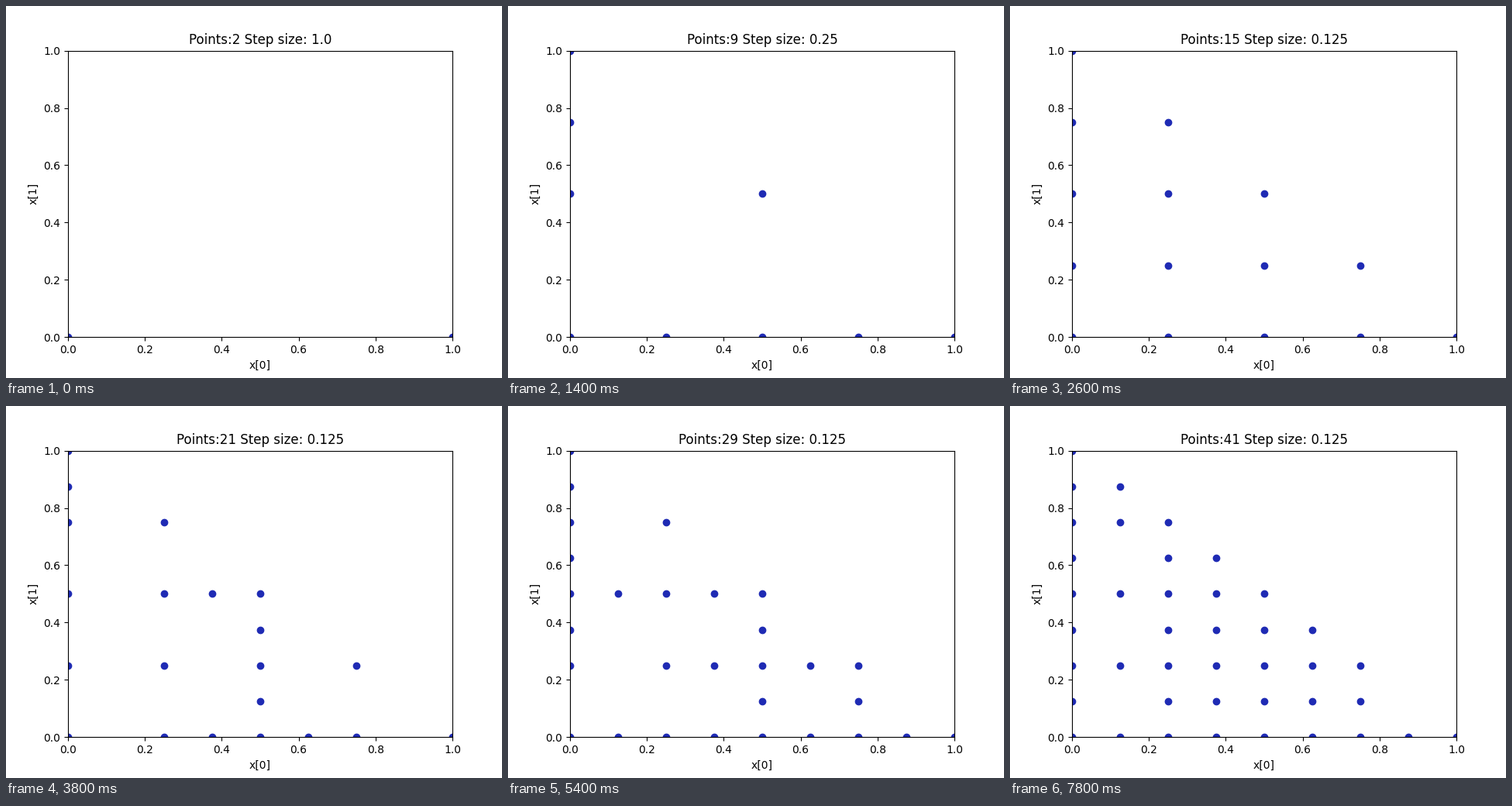
These frames come from a looping animation (640 by 480 pixels, 8 s). A matplotlib script:

```python
import numpy as np
import matplotlib.pyplot as plt
from matplotlib.animation import FuncAnimation

SIDE = 8
STRAIGHT = [(-1, 0), (1, 0), (0, -1), (0, 1)]
SLANTED = [(-1, 1), (1, -1)]
# Grid nodes in the order in which their edges are split.
HUBS = [(0, 8), (4, 0), (4, 4), (6, 0), (4, 2), (0, 4), (0, 0), (2, 2), (2, 6)]


def midpoints(hubs, directions, size):
    """Middles of all edges of the given size that leave the hubs."""
    found = {}
    for x, y in hubs:
        if x % size or y % size:
            continue
        for dx, dy in directions:
            u, v = x + size * dx, y + size * dy
            if min(u, v) >= 0 and u + v <= SIDE:
                found[(x + u) // 2, (y + v) // 2] = True
    return list(found)


def refine():
    """Points in order of discovery and the counts at which the step halves."""
    points = [(0, 0), (SIDE, 0), (0, SIDE)]
    halvings = []
    for size in (8, 4, 2):
        halvings.append(len(points))
        points += midpoints(HUBS, STRAIGHT, size)
        # Slanted edges come last, those near the axes first.
        points += sorted(midpoints(HUBS[:5], SLANTED, size), key=min)
    return np.array(points) / SIDE, np.array(halvings)


points, halvings = refine()
start = 2

fig, ax = plt.subplots(figsize=(6.4, 4.8), dpi=100)
ax.set(xlim=(0, 1), ylim=(0, 1), xlabel="x[0]", ylabel="x[1]")
dots = ax.scatter([], [], color="#1f2bb4")
title = ax.set_title("")


def update(frame):
    count = start + frame
    step = 0.5 ** int(np.sum(halvings <= count))
    dots.set_offsets(points[:count])
    title.set_text(f"Points:{count} Step size: {step}")
    return dots, title


anim = FuncAnimation(fig, update, frames=len(points) - start + 1,
                     interval=200, repeat=True, repeat_delay=0)
plt.show()
```
